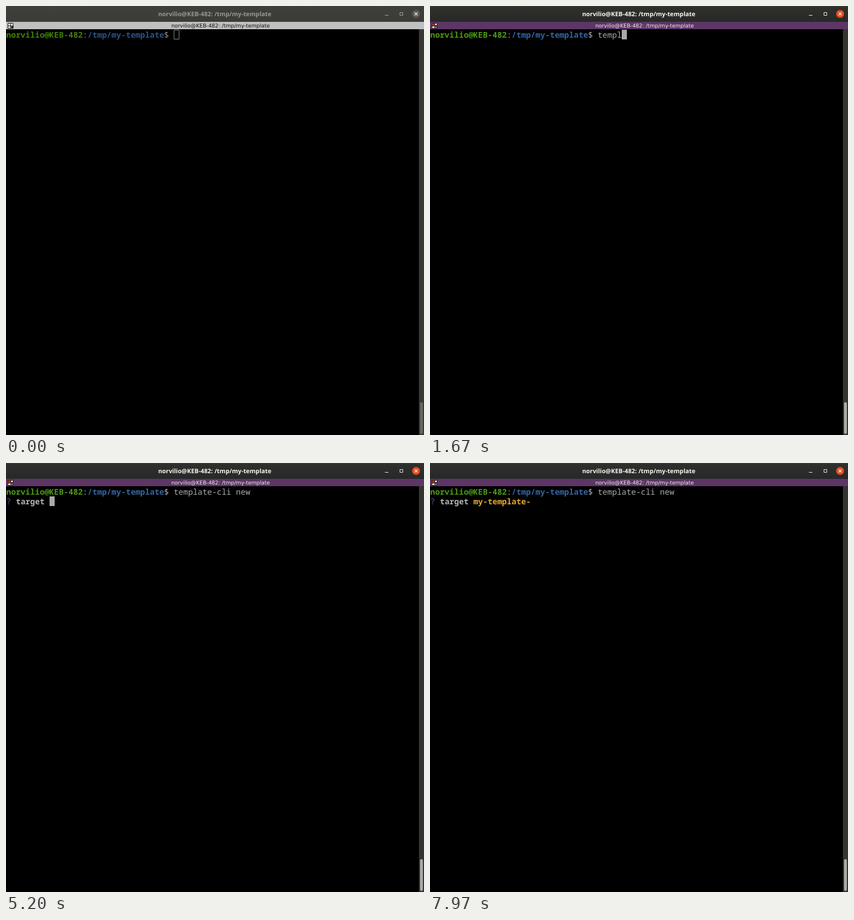
Recreate the animation shown at these times as an HTML page. Size 739 px wide and 758 px high, loop 8 s.

```html
<!DOCTYPE html>
<html lang="en">
<head>
<meta charset="utf-8">
<title>Terminal</title>
<style>
  html, body { margin: 0; height: 100%; overflow: hidden; background: #000; }
  svg { display: block; }
  text { white-space: pre; text-rendering: geometricPrecision; }
  .mono { font: 14.1px "Noto Sans Mono", "DejaVu Sans Mono", monospace; }
  .title { font: bold 10.8px "Noto Sans", "Open Sans", sans-serif; text-anchor: middle; }
  .tab { font: 9.33px "DejaVu Sans", sans-serif; text-anchor: middle; }
  .b { font-weight: bold; }
</style>
</head>
<body>
<svg id="stage" width="739" height="758" viewBox="0 0 739 758">
  <defs>
    <linearGradient id="barOn" x2="0" y2="1"><stop stop-color="#30302d"/><stop offset="1" stop-color="#282828"/></linearGradient>
    <linearGradient id="barOff" x2="0" y2="1"><stop stop-color="#403f3b"/><stop offset="1" stop-color="#3b3b38"/></linearGradient>
  </defs>
  <g id="off"></g>
  <g id="on"></g>
  <text id="command" class="mono" x="296.6" y="55.5" fill="#aaa"></text>
  <text class="mono" y="72.5" x="0.5"><tspan id="mark" fill="#5656a0"></tspan><tspan id="label" class="b" fill="#b4b4b0"></tspan><tspan id="answer" class="b" fill="#e5a52e"></tspan></text>
  <rect id="caret" width="9" height="17" fill="#aaa"/>
  <g id="pointer" fill="none">
    <path id="beam" d="M-3.5-6.5H-1L0-5.5 1-6.5H3.5M0-5.5V5.5M-3.5 6.5H-1L0 5.5 1 6.5H3.5" stroke="#ddd" stroke-width="3"/>
    <path d="M-3-6.5H-1L0-5.5 1-6.5H3M0-5.5V5.5M-3 6.5H-1L0 5.5 1 6.5H3" stroke="#222"/>
  </g>
</svg>
<script>
const $ = id => document.getElementById(id);
const LOOP = 8000, CELL = 8.46;
const user = 'norvilio@KEB-482', path = '/tmp/my-template';

const looks = {
  off: { bar: 'url(#barOff)', title: '#969692', buttons: '#a5a5a0', close: '#5a5955', tab: '#c0c0c0', label: '#111',
    trough: '#393835', slider: '#656561', user: '#437f0b', path: '#2c528a', text: '#8c8c8c',
    icon: '<path d="M3.5 30.5h9v9h-9zM8 30.5v9M3.5 35h9" fill="#eee" stroke="#111"/><path d="M8 36h6l-3 4z" fill="#111"/>' },
  on: { bar: 'url(#barOn)', title: '#f4f4f1', buttons: '#eee', close: '#e24d20', tab: '#5d3666', label: '#eee',
    trough: '#353431', slider: '#aaaaa7', user: '#4e9a12', path: '#3465a4', text: '#aaa',
    icon: '<path d="M3 30h10v10H3z" fill="#222"/><path d="M4 31h4v4H4z" fill="#d82020"/><path d="M9 31h3v3H9zM4 36h4v3H4z" fill="#ddd"/><path d="M9 36h3v3H9z" fill="#777"/>' }
};

const drawWindow = c => `
  <rect width="739" height="758"/>
  <rect width="739" height="28" fill="${c.bar}"/>
  <rect width="739" height="1" fill="#3c3d2c"/>
  <text class="title" x="369" y="18.3" fill="${c.title}">${user}: ${path}</text>
  <path d="M670 16.5h6M696.5 11.5h5v5h-5z" fill="none" stroke="${c.buttons}"/>
  <circle cx="725" cy="14" r="7" fill="${c.close}"/>
  <path d="M722.3 11.3l5.4 5.4m0-5.4l-5.4 5.4" stroke="#fff" stroke-width="1.2"/>
  <rect y="28" width="739" height="13" fill="${c.tab}"/>
  ${c.icon}
  <text class="tab" x="379.3" y="37.6" fill="${c.label}">${user}: ${path}</text>
  <rect x="730" y="41" width="9" height="717" fill="${c.trough}"/>
  <rect x="732" y="700" width="5" height="56" rx="2.5" fill="${c.slider}"/>
  <text class="mono" x="0.5" y="55.5" fill="${c.text}"><tspan class="b" fill="${c.user}">${user}</tspan>:<tspan class="b" fill="${c.path}">${path}</tspan>$</text>`;

for (const id in looks) $(id).innerHTML = drawWindow(looks[id]);
$('on').insertAdjacentHTML('beforeend', '');
$('off').insertAdjacentHTML('beforeend', '<path d="M297 42.5h9v16h-9z" fill="none" stroke="#8c8c8c"/>');

// Key press times in ms
const commandKeys = [1130, 1230, 1370, 1500, 1630, 1800, 1930, 2070, 2270, 2470, 2630, 2730, 2870, 3230, 3700, 3900];
const answerKeys = [5430, 5630, 5830, 6230, 6370, 6530, 6670, 6800, 6870, 7000, 7070, 7370];
const ENTER = 4200, ASK = 4430;

const clamp = x => Math.min(1, Math.max(0, x));
const typed = (text, keys, t) => text.slice(0, keys.filter(k => k <= t).length);

function render(t) {
  const focus = clamp((t - 500) / 150);
  $('on').setAttribute('opacity', focus);

  const command = typed('template-cli new', commandKeys, t);
  const answer = typed('my-template-', answerKeys, t);
  const asked = t >= ASK;
  $('command').textContent = command;
  $('mark').textContent = asked ? '? ' : '';
  $('label').textContent = asked ? 'target ' : '';
  $('answer').textContent = answer;

  const second = t >= ENTER;
  const col = second ? (asked ? 9 + answer.length : 0) : 35 + command.length;
  const blinkedOff = (t >= 4600 && t < 5130) || t >= 7870;
  $('caret').setAttribute('x', Math.round(0.5 + col * CELL));
  $('caret').setAttribute('y', second ? 59 : 42);
  $('caret').setAttribute('opacity', blinkedOff ? 0 : focus);

  // The pointer glides in, then hides once typing begins
  const p = clamp((t - 150) / 350), e = 1 - (1 - p) ** 2;
  const x = 420 - 88 * e, y = 30 + 155 * e;
  $('pointer').setAttribute('transform', `translate(${x} ${y})`);
  $('pointer').setAttribute('visibility', y > 48 && t < commandKeys[0] ? 'visible' : 'hidden');
}

function tick(now) {
  render(now % LOOP);
  requestAnimationFrame(tick);
}
render(0);
requestAnimationFrame(tick);
</script>
</body>
</html>
```
